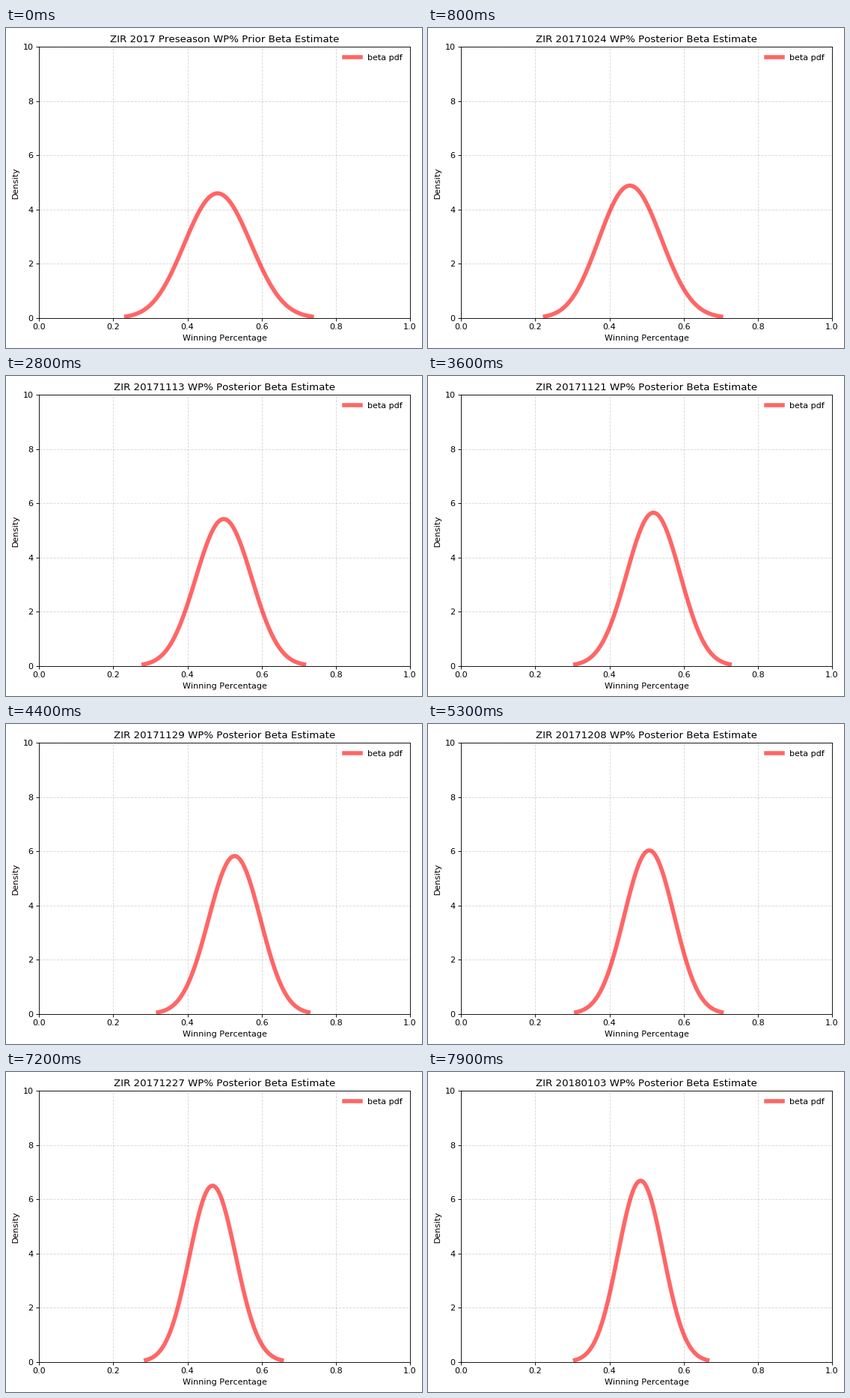
Recreate the animation shown at these times as a matplotlib script. Size 556 px wide and 428 px high, loop 8000 ms.

```python
from math import lgamma

import matplotlib.pyplot as plt
import numpy as np
from matplotlib.animation import FuncAnimation

W, H, DPI = 556, 428, 80
DAYS = 80
START = np.datetime64("2017-10-16")
TEAM = "ZIR"

PRIOR_A, PRIOR_B = 16.2, 17.4
# Season milestones: (day, wins, losses); games are spread evenly between
MILESTONES = [(0, 0, 0), (5, 0, 3), (16, 4, 4), (28, 7, 6), (44, 12, 8),
              (53, 13, 11), (64, 14, 16), (68, 14, 18), (79, 18, 19)]
GRID = np.linspace(0, 1, 8001)[1:-1]


def record(day):
    """Whole wins and losses up to the given day."""
    days, *tallies = zip(*MILESTONES)
    return [int(np.interp(day, days, t) + 0.5) for t in tallies]


def beta_pdf(x, a, b):
    log_norm = lgamma(a + b) - lgamma(a) - lgamma(b)
    return np.exp(log_norm + (a - 1) * np.log(x) + (b - 1) * np.log(1 - x))


def beta_curve(a, b, tail=0.001):
    """Density between the two tail quantiles."""
    cdf = np.cumsum(beta_pdf(GRID, a, b))
    lo, hi = np.interp([tail, 1 - tail], cdf / cdf[-1], GRID)
    x = np.linspace(lo, hi, 100)
    return x, beta_pdf(x, a, b)


def title_for(day):
    if day == 0:
        return f"{TEAM} 2017 Preseason WP% Prior Beta Estimate"
    date = str(START + day).replace("-", "")
    return f"{TEAM} {date} WP% Posterior Beta Estimate"


plt.rcParams.update({"font.family": "DejaVu Sans", "text.kerning_factor": 6})
fig = plt.figure(figsize=(W / DPI, H / DPI), dpi=DPI, facecolor="white")
ax = fig.add_axes([44.12 / W, 40.4 / H, 496 / W, 362.4 / H])
ax.set(xlim=(0, 1), ylim=(0, 10),
       xlabel="Winning Percentage", ylabel="Density")
ax.grid(linestyle="--", alpha=0.5)
curve, = ax.plot([], [], "r-", lw=5, alpha=0.6, label="beta pdf")
title = ax.set_title(title_for(0))
ax.legend(loc="upper right", frameon=False)


def draw(day):
    wins, losses = record(day)
    curve.set_data(*beta_curve(PRIOR_A + wins, PRIOR_B + losses))
    title.set_text(title_for(day))
    return curve, title


anim = FuncAnimation(fig, draw, frames=DAYS, interval=100,
                     repeat=True, repeat_delay=0, blit=False)
plt.show()
```
